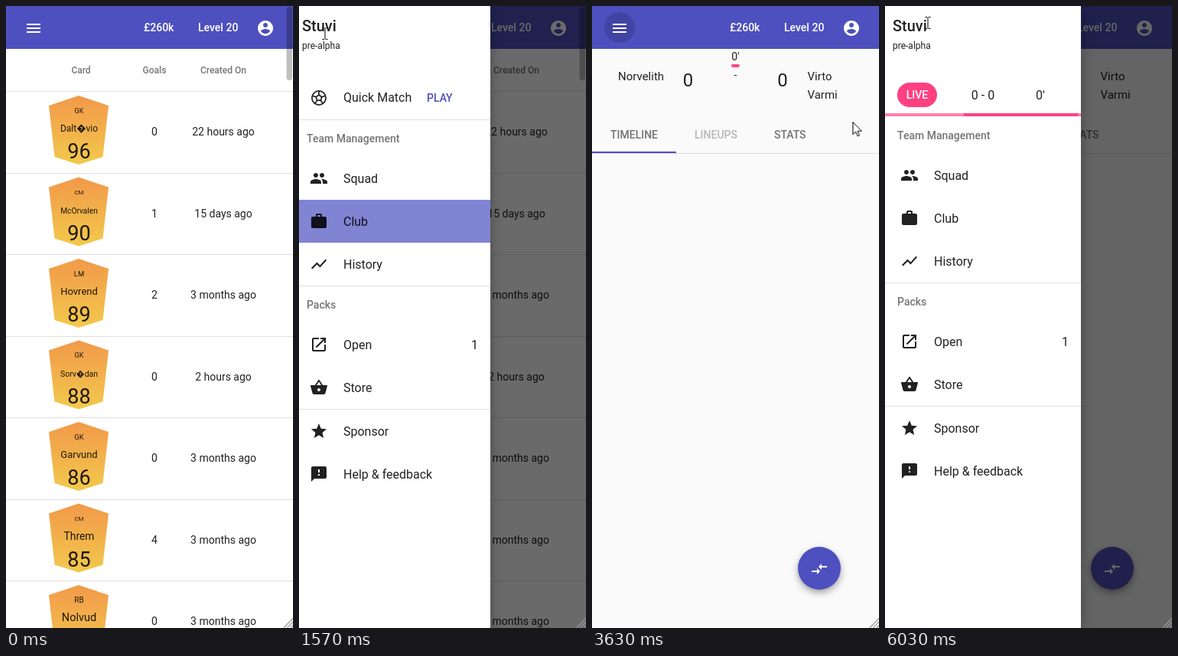
Recreate the animation shown at these times as an HTML page. Size 375 px wide and 812 px high, loop 6060 ms.

```html
<!DOCTYPE html>
<html lang="en">
<head>
<meta charset="utf-8">
<title>Football manager walkthrough</title>
<style>
html, body { margin: 0; width: 100%; height: 100%; overflow: hidden; background: #fff; }
#stage { display: block; width: 375px; height: 812px; font: 14px Roboto, Arial, sans-serif; fill: rgba(0,0,0,.87); }
#stage * { animation: 6060ms linear infinite; }
.bold { font-weight: 500; }
.mid { text-anchor: middle; }
.white { fill: #fff; }
.dim { fill: rgba(0,0,0,.54); }
.line { fill: rgba(0,0,0,.12); }
.primary { fill: #4d50be; }
.pink { fill: #ff4081; }

/* hard switches */
#stage .before, #stage .after, #stage .empty, #stage .loaded, #stage .tabs,
#stage .idle, #stage .live, #stage .menu,
#stage .arrow, #stage .hand, #stage .beam { animation-timing-function: step-end; }
#stage .before { animation-name: before; }
#stage .after { animation-name: after; }
#stage .empty { animation-name: empty; }
#stage .loaded { animation-name: loaded; }
#stage .tabs { animation-name: tabs; }
#stage .idle { animation-name: idle; }
#stage .live { animation-name: live; }
#stage .menu { animation-name: menu; }
@keyframes before { 0% { opacity: 1 } 49.42%, 100% { opacity: 0 } }
@keyframes after { 0% { opacity: 0 } 49.42%, 100% { opacity: 1 } }
@keyframes empty { 0% { opacity: 1 } 52.81%, 100% { opacity: 0 } }
@keyframes loaded { 0% { opacity: 0 } 52.81%, 100% { opacity: 1 } }
@keyframes tabs { 0% { transform: translateY(-44px) } 52.81%, 100% { transform: none } }
@keyframes idle { 0% { opacity: 1 } 74%, 100% { opacity: 0 } }
@keyframes live { 0% { opacity: 0 } 74%, 100% { opacity: 1 } }
@keyframes menu { 0% { transform: none } 74%, 100% { transform: translateY(-4px) } }

/* drawer and backdrop share one curve */
#stage .drawer { animation-name: drawer; }
#stage .shade { animation-name: shade; }
#stage .drawer, #stage .shade { animation-timing-function: cubic-bezier(.25,.8,.25,1); }
.panel { fill: #fff; filter: drop-shadow(0 6px 8px rgba(0,0,0,.3)); }
@keyframes drawer {
  0%, 21.62% { transform: translateX(-256px); visibility: hidden }
  28.22%, 49.42% { transform: none; visibility: visible }
  56.02%, 92.28% { transform: translateX(-256px); visibility: hidden }
  98.88%, 100% { transform: none; visibility: visible }
}
@keyframes shade {
  0%, 21.62% { opacity: 0 }
  28.22%, 49.42% { opacity: .6 }
  56.02%, 92.28% { opacity: 0 }
  98.88%, 100% { opacity: .6 }
}

/* touch feedback */
#stage .focus { animation-name: focus; }
#stage .row { animation-name: row; }
#stage .press { animation-name: press; }
#stage .fab { animation-name: fab; filter: drop-shadow(0 4px 5px rgba(0,0,0,.36)); }
@keyframes focus { 0%, 16.01% { opacity: 0 } 19.31%, 100% { opacity: .14 } }
@keyframes row { 0%, 32% { opacity: 0 } 33%, 44.55% { opacity: .04 } 47.9%, 100% { opacity: .1 } }
@keyframes press { 0%, 44.55% { opacity: 0 } 47.9%, 100% { opacity: 1 } }
@keyframes fab { 0%, 49.42% { fill: #b957a8 } 50.66% { fill: #9a57b9 } 56%, 100% { fill: #4d50be } }

/* pointer */
#stage .cursor { animation-name: path; }
#stage .arrow { animation-name: arrow; }
#stage .hand { animation-name: hand; }
#stage .beam { animation-name: beam; }
.cursor path { fill: #fff; stroke: #000; stroke-linejoin: round; }
@keyframes path {
  0%, 1.4% { transform: translate(384px,816px); animation-timing-function: cubic-bezier(.3,.2,.4,1) }
  11.55%, 12.05% { transform: translate(29px,40px) }
  12.71%, 22% { transform: translate(33px,36px) }
  25.91%, 26.4% { transform: translate(34px,36px); animation-timing-function: ease-in-out }
  34.65%, 37.46% { transform: translate(197px,126px) }
  37.95%, 54.95% { transform: translate(199px,124px); animation-timing-function: ease-in-out }
  59.41% { transform: translate(345px,150px); animation-timing-function: ease-in-out }
  64.36%, 65.51% { transform: translate(124px,200px); animation-timing-function: ease-in-out }
  70.13% { transform: translate(362px,238px); animation-timing-function: ease-in-out }
  75.41%, 75.91% { transform: translate(292px,112px) }
  78.05% { transform: translate(170px,113px); animation-timing-function: ease-out }
  85.81%, 86.96% { transform: translate(36px,36px) }
  92.41%, 97.36% { transform: translate(41px,28px) }
  99.5%, 100% { transform: translate(56px,22px) }
}
@keyframes arrow {
  0% { opacity: 1 } 10.7% { opacity: 0 } 27% { opacity: 1 } 33.3% { opacity: 0 }
  54.95% { opacity: 1 } 83% { opacity: 0 } 92.28% { opacity: 1 } 98.5%, 100% { opacity: 0 }
}
@keyframes hand {
  0% { opacity: 0 } 10.7% { opacity: 1 } 22.3% { opacity: 0 } 33.3% { opacity: 1 }
  54.95% { opacity: 0 } 83% { opacity: 1 } 92.28%, 100% { opacity: 0 }
}
@keyframes beam {
  0% { opacity: 0 } 22.3% { opacity: 1 } 27% { opacity: 0 } 98.5%, 100% { opacity: 1 }
}

/* indeterminate progress: three cycles per loop, lengths in bar widths */
#stage .bar * { animation-duration: 2020ms; animation-delay: var(--delay); }
#stage .move1 { animation-name: move1; }
#stage .size1 { animation-name: size1; }
#stage .move2 { animation-name: move2; }
#stage .size2 { animation-name: size2; }
@keyframes move1 {
  0% { transform: translateX(-1.4517px) }
  20% { transform: translateX(-1.4517px); animation-timing-function: cubic-bezier(.5,0,.7017,.4958) }
  59.15% { transform: translateX(-.615px); animation-timing-function: cubic-bezier(.3024,.3814,.55,.9564) }
  100% { transform: translateX(.5544px) }
}
@keyframes size1 {
  0% { transform: scaleX(.08) }
  36.65% { transform: scaleX(.08); animation-timing-function: cubic-bezier(.3347,.1248,.7858,1) }
  69.15% { transform: scaleX(.6615); animation-timing-function: cubic-bezier(.06,.11,.6,1) }
  100% { transform: scaleX(.08) }
}
@keyframes move2 {
  0% { transform: translateX(-.5489px); animation-timing-function: cubic-bezier(.15,0,.5151,.4097) }
  25% { transform: translateX(-.1724px); animation-timing-function: cubic-bezier(.3103,.2841,.8,.7337) }
  48.35% { transform: translateX(.295px); animation-timing-function: cubic-bezier(.4,.627,.6,.902) }
  100% { transform: translateX(1.0539px) }
}
@keyframes size2 {
  0% { transform: scaleX(.08); animation-timing-function: cubic-bezier(.205,.0571,.5766,.454) }
  19.15% { transform: scaleX(.4571); animation-timing-function: cubic-bezier(.1523,.1964,.6484,1) }
  44.15% { transform: scaleX(.728); animation-timing-function: cubic-bezier(.2578,0,.2118,1.3818) }
  100% { transform: scaleX(.08) }
}
</style>
</head>
<body>
<svg id="stage" viewBox="0 0 375 812"></svg>
<script>
const icons = {
  menu: 'M3 18h18v-2H3zm0-5h18v-2H3zm0-7v2h18V6z',
  account: 'M12 2C6.48 2 2 6.48 2 12s4.48 10 10 10 10-4.48 10-10S17.52 2 12 2zm0 3c1.66 0 3 1.34 3 3s-1.34 3-3 3-3-1.34-3-3 1.34-3 3-3zm0 14.2c-2.5 0-4.71-1.28-6-3.22.03-1.99 4-3.08 6-3.08 1.99 0 5.97 1.09 6 3.08-1.29 1.94-3.5 3.22-6 3.22z',
  squad: 'M16 11c1.66 0 2.99-1.34 2.99-3S17.66 5 16 5s-3 1.34-3 3 1.34 3 3 3zm-8 0c1.66 0 2.99-1.34 2.99-3S9.66 5 8 5 5 6.34 5 8s1.34 3 3 3zm0 2c-2.33 0-7 1.17-7 3.5V19h14v-2.5c0-2.33-4.67-3.5-7-3.5zm8 0c-.29 0-.62.02-.97.05 1.16.84 1.97 1.97 1.97 3.45V19h6v-2.5c0-2.33-4.67-3.5-7-3.5z',
  club: 'M20 6h-4V4c0-1.11-.89-2-2-2h-4c-1.11 0-2 .89-2 2v2H4c-1.11 0-2 .89-2 2v11c0 1.11.89 2 2 2h16c1.11 0 2-.89 2-2V8c0-1.11-.89-2-2-2zm-6 0h-4V4h4z',
  history: 'M3.5 18.49l6-6.01 4 4L22 6.92l-1.41-1.41-7.09 7.97-4-4L2 16.99z',
  open: 'M19 19H5V5h7V3H5c-1.11 0-2 .9-2 2v14c0 1.1.89 2 2 2h14c1.1 0 2-.9 2-2v-7h-2zM14 3v2h3.59l-9.83 9.83 1.41 1.41L19 6.41V10h2V3z',
  store: 'M17.21 9l-4.38-6.56c-.4-.56-1.26-.56-1.66 0L6.79 9H2c-.55 0-1 .45-1 1l2.58 9.54c.23.84 1 1.46 1.92 1.46h13c.92 0 1.69-.62 1.93-1.46L23 10c0-.55-.45-1-1-1zM9 9l3-4.4L15 9zm3 8c-1.1 0-2-.9-2-2s.9-2 2-2 2 .9 2 2-.9 2-2 2z',
  star: 'M12 17.27L18.18 21l-1.64-7.03L22 9.24l-7.19-.61L12 2 9.19 8.63 2 9.24l5.46 4.73L5.82 21z',
  help: 'M20 2H4c-1.1 0-2 .9-2 2v18l4-4h14c1.1 0 2-.9 2-2V4c0-1.1-.9-2-2-2zm-7 12h-2v-2h2zm0-4h-2V6h2z',
  swap: 'M9.01 14H2v2h7.01v3L13 15l-3.99-4zm5.98-1v-3H22V8h-7.01V5L11 9z'
};

const text = (s, x, y, size = 14, cls = '') =>
  `<text x="${x}" y="${y}" font-size="${size}" class="${cls}">${s}</text>`;
const rect = (x, y, w, h, cls = '', extra = '') =>
  `<rect x="${x}" y="${y}" width="${w}" height="${h}" class="${cls}" ${extra}/>`;
const icon = (name, x, y, cls = '') =>
  `<path d="${icons[name]}" transform="translate(${x} ${y})" class="${cls}"/>`;
const group = (cls, ...parts) => `<g class="${cls}">${parts.join('')}</g>`;

const bar = (x, y, w, delay) =>
  `<svg class="bar" style="--delay:${-delay}ms" x="${x}" y="${y}" width="${w}" height="4" viewBox="0 0 1 1" preserveAspectRatio="none">
    <rect width="1" height="1" fill="#ff80ab"/>` +
  [1, 2].map(n => group('move' + n, rect(0, 0, 1, 1, 'pink size' + n))).join('') + '</svg>';

// position, its size, name, its size, rating, goals, age
const players = [
  ['GK', 9, 'Dalt\ufffdvio', 12, 96, 0, '22 hours'],
  ['CM', 8, 'McOrvalen', 10.2, 90, 1, '15 days'],
  ['LM', 9.5, 'Hovrend', 13, 89, 2, '3 months'],
  ['GK', 9, 'Sorv\ufffddan', 10.5, 88, 0, '2 hours'],
  ['GK', 9.5, 'Garvund', 13, 86, 0, '3 months'],
  ['CM', 8, 'Threm', 13.8, 85, 4, '3 months'],
  ['RB', 10, 'Nolvud', 14.5, 84, 0, '3 months']
];
const playerRow = ([pos, posSize, name, nameSize, rating, goals, age], i) => {
  const y = 111.5 + i * 106.5;
  return `<path d="M95 ${y + 5.5}l39 13-7.5 67L95 ${y + 95.5}l-31.5-10-7.5-67z" fill="url(#gold)"/>` +
    text(pos, 95.5, y + 28.3, posSize, 'mid') +
    text(name, 95.5, y + 52.5, nameSize, 'mid') +
    text(rating, 95.5, y + 87.5, 27, 'mid') +
    text(goals, 194, y + 57.5, 14, 'mid') +
    text(age + ' ago', 284, y + 57.5, 14, 'mid') +
    rect(0, Math.floor(y + 106.5), 375, 1, 'line');
};

const clubPage = group('before',
  rect(0, 56, 375, 756, 'white'),
  text('Card', 98, 88, 12, 'bold dim mid'),
  text('Goals', 194, 88, 12, 'bold dim mid'),
  text('Created On', 284, 88, 12, 'bold dim mid'),
  rect(0, 111, 375, 1, 'line'),
  players.map(playerRow).join(''));

const matchPage = group('after',
  rect(0, 56, 375, 756, '', 'fill="#fafafa"'),
  group('empty', text("'", 187.5, 71, 14, 'mid'), bar(186, 76, 3, 1229)),
  text('-', 187.5, 95, 14, 'mid'),
  group('loaded',
    text("0'", 187.5, 71, 14, 'mid'), bar(182, 76, 11, 1229),
    text('Norvelith', 34, 97, 15),
    text('0', 125.5, 105, 24, 'mid'), text('0', 249, 105, 24, 'mid'),
    text('Virto', 281.5, 97, 15), text('Varmi', 281.5, 121, 15)),
  group('tabs',
    text('TIMELINE', 24, 173, 14, 'bold dim'),
    `<g opacity=".5">${text('LINEUPS', 134, 173, 14, 'bold dim')}</g>`,
    text('STATS', 238, 173, 14, 'bold dim'),
    rect(0, 192, 375, 1, 'line'), rect(0, 190, 110, 2, 'primary')),
  '<circle class="fab" cx="297" cy="734" r="28"/>',
  icon('swap', 285, 723, 'white'));

const toolbar = rect(0, 0, 375, 56, 'primary') +
  '<circle class="focus" cx="36" cy="28" r="20" fill="#000"/>' +
  icon('menu', 24, 17, 'white') +
  text('£260k', 180, 33, 14, 'bold white') +
  text('Level 20', 251, 33, 14, 'bold white') +
  icon('account', 327, 17, 'white') +
  group('before', rect(366.5, 1, 7.5, 96, '', 'rx="3.7" fill="#000" fill-opacity=".25"'));

const grip = '<path d="M363 811.5l12-12M367.5 811.5l7.5-7.5M372 811.5l3-3" stroke="#999" stroke-width="1.2"/>';

const item = (label, name, y) => icon(name, 20, y - 12) + text(label, 64, y + 5.5, 16);

const spoke = a => `<path d="M12 8.4V3" transform="rotate(${a} 12 12)"/>`;
const ball = `<g transform="translate(20 108)" fill="none" stroke="#212121" stroke-width="1.7">
  <circle cx="12" cy="12" r="9.1"/><path d="M12 8l3.8 2.8-1.4 4.4H9.6l-1.4-4.4z"/>
  ${[0, 72, 144, 216, 288].map(spoke).join('')}</g>`;

const drawer = group('drawer',
  rect(0, 0, 256, 812, 'panel'),
  text('Stuvi', 10, 33, 20, 'bold'),
  text('pre-alpha', 10, 56, 12),
  group('idle',
    rect(0, 92, 256, 56, 'row'),
    rect(158, 102, 64, 36, 'press', 'rx="4" style="fill:#d2d6e6"'),
    ball, text('Quick Match', 64, 125, 16),
    text('PLAY', 173, 125, 14, 'bold primary'),
    rect(0, 148, 256, 1, 'line')),
  group('live',
    rect(16, 100, 52, 32, 'pink', 'rx="16"'),
    text('LIVE', 42, 121, 14, 'bold white mid'),
    text('0 - 0', 128, 122, 16, 'mid'),
    text("0'", 203, 122, 16, 'mid'),
    bar(0, 140, 256, 1100)),
  group('menu',
    group('before', rect(0, 253, 256, 56, '', 'fill="#8184d2"')),
    text('Team Management', 16, 178, 14, 'bold dim'),
    item('Squad', 'squad', 225),
    item('Club', 'club', 281),
    item('History', 'history', 337),
    rect(0, 365, 256, 1, 'line'),
    text('Packs', 16, 395, 14, 'bold dim'),
    item('Open', 'open', 442), text('1', 231, 448, 16),
    item('Store', 'store', 498),
    rect(0, 526, 256, 1, 'line'),
    item('Sponsor', 'star', 555),
    item('Help &amp; feedback', 'help', 611)));

const cursor = group('cursor',
  '<path class="arrow" d="M.5.5V16.6l3.7-3.5 2.5 5.7 2.4-1-2.5-5.6h5.2z"/>',
  group('hand',
    '<path d="M-1.7 1.8C-1.7 0 1.3 0 1.3 1.8V8.2C2 7 4.2 7.3 4.3 8.8 5 7.9 6.8 8.3 6.9 9.7 7.7 9.2 9 9.8 9 11.2V16C9 18.5 7.4 19.5 7.4 23H-1.5C-1.8 20-3.5 18.5-5.2 15.5-6.6 13-5.2 11.3-3.2 12.8L-1.7 14.3z"/>',
    '<path d="M1.3 8v4M4.3 8.8V12M6.9 9.7v2.8"/>'),
  '<path class="beam" style="fill:none" d="M-3.5-7.5h2.5l1 1 1-1h2.5M0-6.5v13M-3.5 7.5h2.5l1-1 1 1h2.5"/>');

document.getElementById('stage').innerHTML =
  `<defs><linearGradient id="gold" x2="0" y2="1">
    <stop stop-color="#f2994a"/><stop offset="1" stop-color="#f2c94c"/></linearGradient></defs>` +
  clubPage + matchPage + toolbar +
  rect(0, 0, 375, 812, 'shade', 'fill="#000"') +
  drawer + grip + cursor;
</script>
</body>
</html>
```
